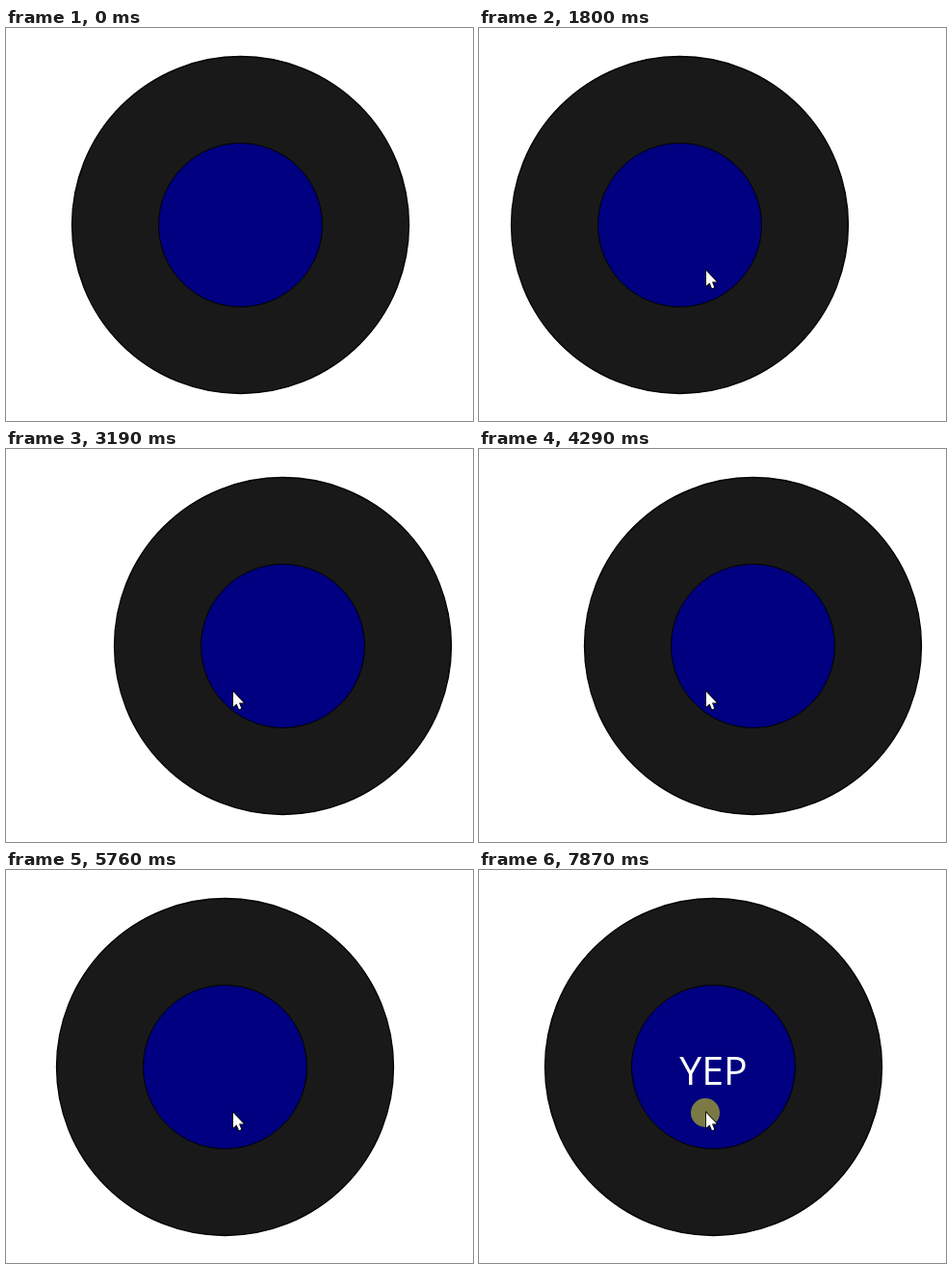
An HTML page that plays this animation: 485 by 408 pixels, repeating every 8000 ms.

```html
<!DOCTYPE html>
<html lang="en">
<head>
<meta charset="utf-8">
<title>Shake the ball</title>
<style>
html, body { margin: 0; width: 100%; height: 100%; overflow: hidden; background: #fff; }
svg { display: block; width: 485px; height: 408px; }
text { font: 500 41px "Open Sans", "Noto Sans", sans-serif; fill: #fff; text-anchor: middle; }
</style>
</head>
<body>
<svg viewBox="0 0 485 408">
  <g id="ball" stroke="#000">
    <circle cx="243.5" cy="204.5" r="175" fill="#191919" stroke-width="1.3"/>
    <circle cx="243.5" cy="204.5" r="85" fill="#000080"/>
  </g>
  <text id="answer" x="243.5" y="223">YEP</text>
  <circle id="press" cx="235" cy="252" r="15" fill="#7c7a44"/>
  <path id="pointer" d="M0 0V15.5L3.6 12.4L6 18.3L8.3 17.3L6 11.5H10.8Z" fill="#fff" stroke="#000" stroke-width="1.6" paint-order="stroke"/>
</svg>
<script>
const LOOP = 8000, STEP = 70;
const SWING = 50, LEGS = 7;
const ENTER = 620, MOVES = 9;
const START = { x: 264, y: 377 }, REST = { x: 236, y: 252 };

// phase: how far into its first leg the ball is at the first step
const shakes = [
  { press: 1310, from: 1520, to: 2080, phase: .747 },
  { press: 2770, from: 2920, to: 3460, phase: -.158 },
  { press: 4010, from: 4220, to: 4710, phase: .806 },
  { press: 5270, from: 5410, to: 5970, phase: -.396 },
  { press: 6610, from: 6680, to: 7240, phase: -.442 },
  { press: 7870, from: LOOP, to: LOOP, phase: 0 }
];

const el = id => document.getElementById(id);
const ball = el("ball"), answer = el("answer"), press = el("press"), pointer = el("pointer");
const show = (node, on) => node.setAttribute("visibility", on ? "visible" : "hidden");
const move = (node, x, y) => node.setAttribute("transform", `translate(${x} ${y})`);

// Left, then side to side, then back to the middle, each leg eased
function swing(leg) {
  if (leg <= 0 || leg >= LEGS) return 0;
  const wave = Math.cos(Math.PI * leg);
  if (leg < 1) return SWING * (wave - 1) / 2;
  if (leg > LEGS - 1) return SWING * (wave + 1) / 2;
  return SWING * wave;
}

function shakeOffset({ from, to, phase }, t) {
  const steps = Math.round((to - from) / STEP);
  const step = Math.floor((t - from) * steps / (to - from));
  return Math.round(swing(step + phase));
}

function draw(t) {
  const shake = shakes.find(s => t >= s.from && t < s.to);
  move(ball, shake ? shakeOffset(shake, t) : 0, 0);
  show(answer, t >= shakes[0].to && !shake);
  show(press, shakes.some(s => t >= s.press && t < s.from));

  const p = Math.min(1, Math.max(0, Math.floor((t - ENTER) / STEP) / MOVES));
  const left = (1 - p) ** 2;
  const along = axis => Math.round(REST[axis] + (START[axis] - REST[axis]) * left);
  move(pointer, along("x"), along("y"));
  show(pointer, t >= ENTER);
}

const began = performance.now();
function tick() {
  draw((performance.now() - began) % LOOP);
  requestAnimationFrame(tick);
}
tick();
</script>
</body>
</html>
```
